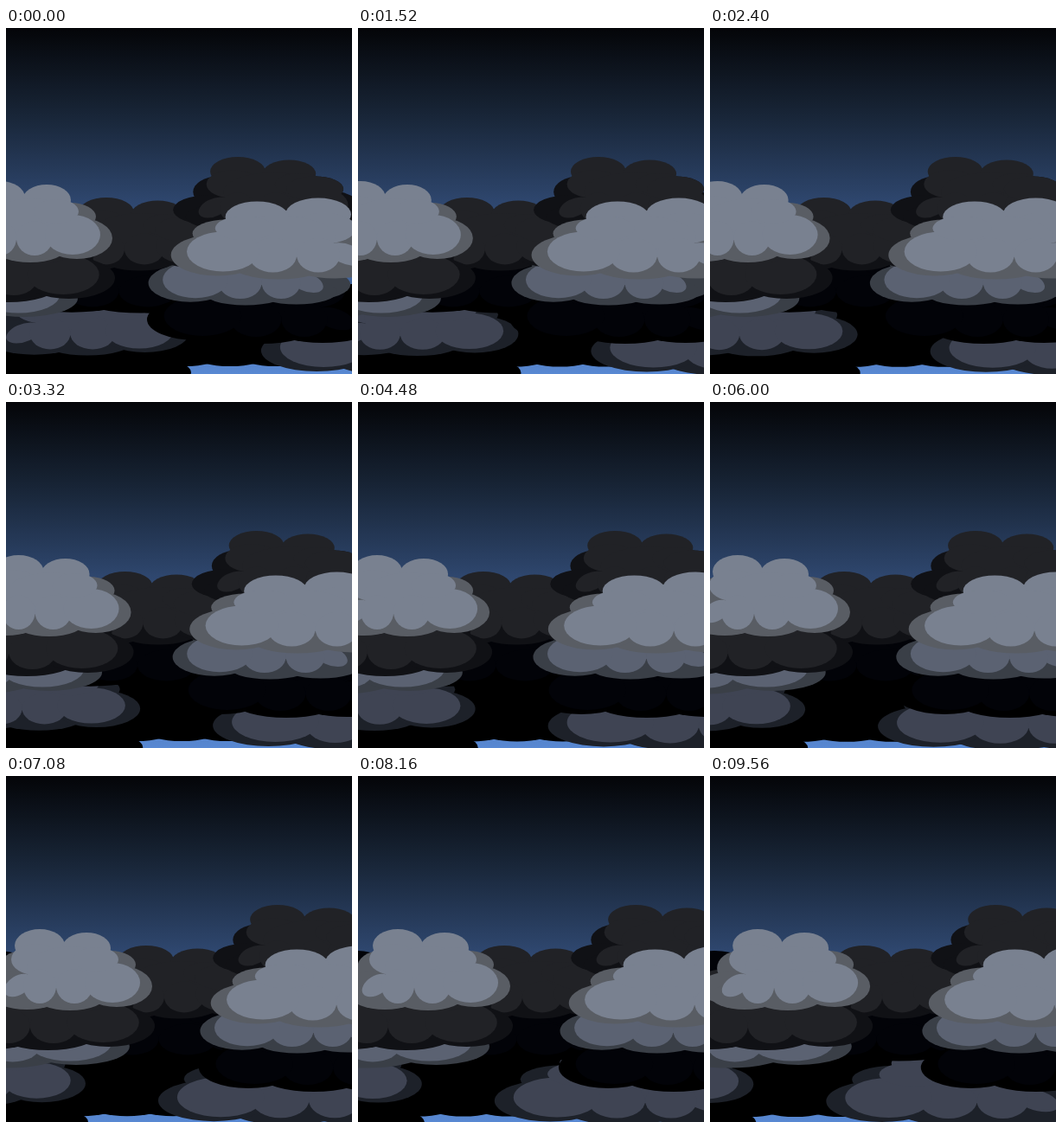
Write an HTML page that moves like this. It is 400 by 400 pixels and loops after 9.6 s.

```html
<!DOCTYPE html>
<html lang="en">
<head>
<meta charset="utf-8">
<title>Drifting night clouds</title>
<style>
html, body { margin: 0; width: 100%; height: 100%; overflow: hidden; background: #000; }
svg { display: block; width: 100vw; height: 100vh; }
</style>
</head>
<body>
<svg id="stage" viewBox="0 0 400 400" preserveAspectRatio="none">
  <defs>
    <linearGradient id="sky" x1="0" y1="0" x2="0" y2="1">
      <stop offset="0" stop-color="#040508"/>
      <stop offset=".25" stop-color="#182537"/>
      <stop offset=".5" stop-color="#2e466d"/>
      <stop offset="1" stop-color="#5888d2"/>
    </linearGradient>
  </defs>
  <rect width="400" height="400" fill="url(#sky)"/>
</svg>
<script>
const NS = 'http://www.w3.org/2000/svg';
const LOOP = 9600, STEP = 40;
const stage = document.getElementById('stage');
const movers = [];

function add(parent, tag, attrs) {
  const node = document.createElementNS(NS, tag);
  for (const key in attrs) node.setAttribute(key, attrs[key]);
  return parent.appendChild(node);
}

// Cloud lobes [cx, cy, rx, ry, tilt], measured from the top of the tallest lobe.
const SHOULDER = [81, 41, 30, 16];
const SHADE = [
  [-20, 45, 27, 20], [-30, 68, 38, 19], [-15, 77, 40, 16],
  [35, 77, 42, 17], [89, 66, 41, 24], SHOULDER
];
const LIT = [
  [0, 19, 29, 19], [54, 22, 28, 18], [-5, 35, 28, 18], [-25, 65, 18, 11, -32],
  [37, 45, 52, 25], [0, 66, 19, 20], [40, 66, 21, 20], [84, 62, 32, 23],
  [65, 35, 26, 14]
];

function lobes(parent, list, fill) {
  const group = add(parent, 'g', { fill });
  for (const [cx, cy, rx, ry, tilt = 0] of list)
    add(group, 'ellipse', { cx, cy, rx, ry, transform: `rotate(${tilt} ${cx} ${cy})` });
}

function mover(vx, vy = 0) {
  const node = add(stage, 'g', {});
  movers.push({ node, vx, vy });
  return node;
}

// A negative sx mirrors the cloud.
function cloud(x, y, sx, sy, [lit, shade], vx, vy = 0, extra = []) {
  const body = add(mover(vx, vy), 'g', { transform: `translate(${x} ${y}) scale(${sx} ${sy})` });
  lobes(body, SHADE, shade);
  lobes(body, LIT.concat(extra), lit);
}

const PALE = ['#798190', '#595d64'];
const GREY = ['#5b6272', '#3a3f47'];
const SLATE = ['#3f4453', '#1d2129'];
const DARK = ['#212226', '#101115'];
const BLACK = ['#020308', '#000'];

// Drift in pixels per second.
const SLOW = 6.5, MID = 8.45, BACK = -16.8, SINK = 0.31;

lobes(mover(SLOW), [[-57, 224, 45, 22]], BLACK[0]);

const base = mover(BACK, SINK);
add(base, 'rect', { x: -50, y: 296, width: 800, height: 91 });
add(base, 'rect', { x: -50, y: 380, width: 220, height: 40 });
lobes(base, [[170, 398, 44, 16]], '#000');
for (let i = 0; i < 8; i++)
  lobes(base, [[206 + 53 * i, 380, 42, 11]], '#000');

cloud(51, 294, 1.23, 0.9, SLATE, BACK, SINK);
cloud(499, 307, -1.57, 1, SLATE, BACK, SINK);
cloud(100, 245, 1.6, 0.9, BLACK, SLOW);
cloud(345, 271, -1.4, 1, BLACK, MID);
cloud(-112, 253, 1.5, 0.9, GREY, MID);
cloud(318, 234, -1.18, 0.92, GREY, MID);
cloud(116, 196, 1.1, 0.9, DARK, SLOW, 0, [SHOULDER]);
cloud(268, 149, 1.1, 0.9, DARK, SLOW, 0, [SHOULDER]);
cloud(-43, 223, 1.3, 1, DARK, SLOW);
cloud(-7, 177, 1, 1, PALE, SLOW);
cloud(361, 196.5, -1.31, 1, PALE, SLOW);

function draw(ms) {
  const t = Math.floor((ms % LOOP) / STEP) * STEP / 1000;
  for (const { node, vx, vy } of movers)
    node.setAttribute('transform', `translate(${vx * t} ${vy * t})`);
}

let start;
function tick(now) {
  if (start === undefined) start = now;
  draw(now - start);
  requestAnimationFrame(tick);
}
draw(0);
requestAnimationFrame(tick);
</script>
</body>
</html>
```
